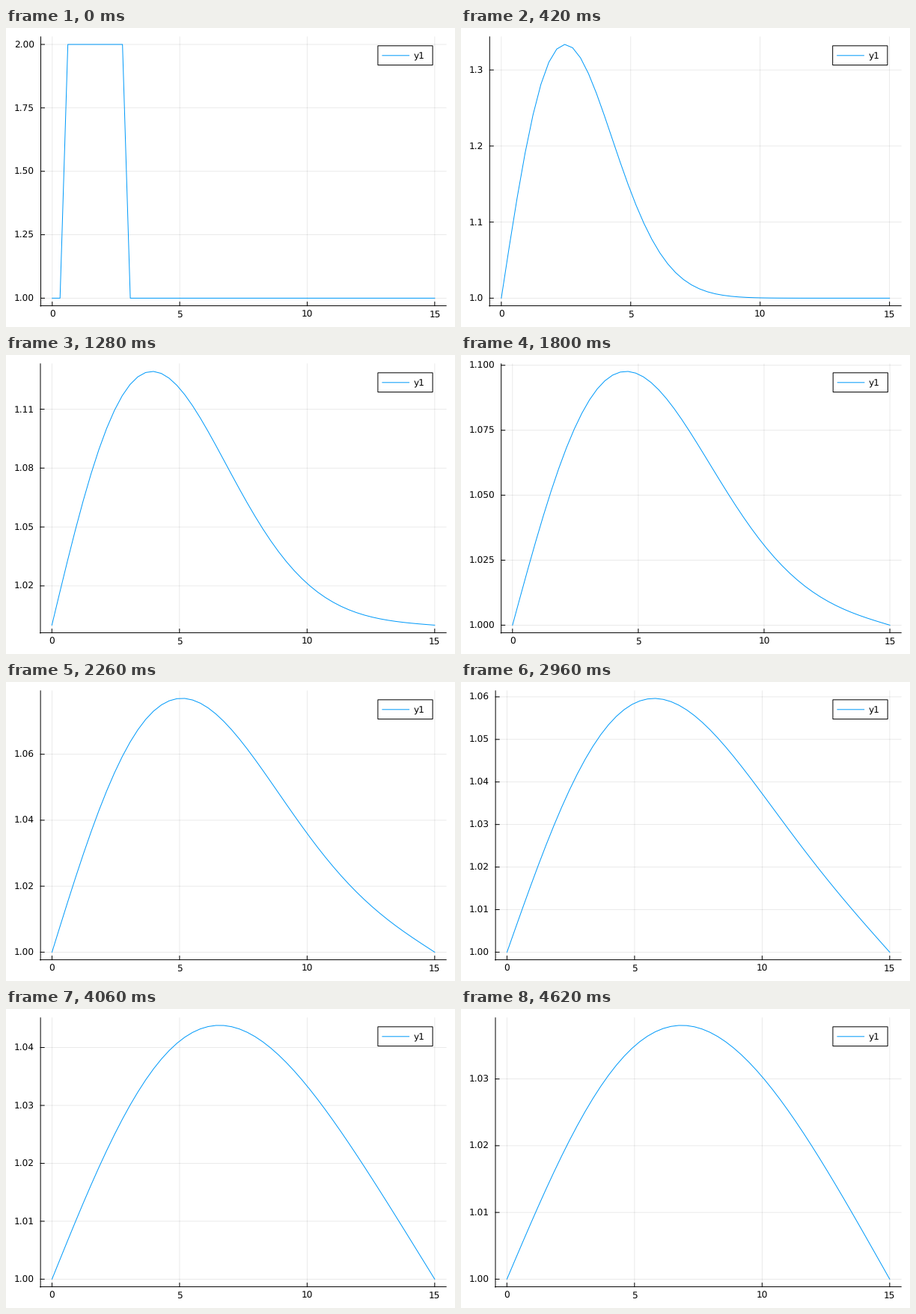
Animation, 600 px wide and 400 px high, one loop 4640 ms. Source, as a matplotlib script:

```python
import math

import numpy as np
import matplotlib.pyplot as plt
from matplotlib.animation import FuncAnimation
from matplotlib.patches import Rectangle
from matplotlib.textpath import TextPath

W, H, DPI = 600, 400, 100
LOOP, TICK = 4640, 20
TOP, BOTTOM, RIGHT = 11.8, 371.6, 588.2
FONT = 12.1
BLUE = "#009AFA"
PAD = 0.03

# Heat equation on 50 points, both ends held at 1, solved with sine modes.
CELLS, LENGTH, DIFFUSION = 49, 15.0, 0.25
xs = np.linspace(0, LENGTH, CELLS + 1)
start = ((xs >= 0.5) & (xs <= 3)).astype(float)
modes = np.arange(1, CELLS)
basis = np.sin(np.pi * np.outer(np.arange(CELLS + 1), modes) / CELLS)
weights = 2 / CELLS * start @ basis
rates = (2 - 2 * np.cos(np.pi * modes / CELLS)) * (CELLS / LENGTH) ** 2

NICE = [(5, 0.9), (3, 0.2), (2.5, 0.5), (2, 0.7), (1, 1.0)]

plt.rcParams["font.family"] = "DejaVu Sans"
plt.rcParams["text.hinting"] = "no_hinting"
fig = plt.figure(figsize=(W / DPI, H / DPI), dpi=DPI, facecolor="white")
ax = fig.add_axes([0, 0, 1, 1])


def profile(step):
    return 1 + basis @ (weights * np.exp(-DIFFUSION * rates * step))


def pick_ticks(lo, hi):
    """Choose 4 to 8 round ticks, weighing count, coverage and niceness."""
    span = hi - lo
    top = math.floor(math.log10(span))
    best, ticks, digits = -1, [], 0
    for z in (top, top - 1, top - 2):
        for q, nice in NICE:
            gap = q * 10.0 ** z
            first = math.ceil(lo / gap - 1e-9)
            n = math.floor(hi / gap + 1e-9) - first + 1
            if not 4 <= n <= 8:
                continue
            score = (0.25 * (1 - abs(n - 5) / 5)
                     + 0.5 * span / ((n - 1) * gap) + 0.25 * nice)
            if score > best + 1e-9:
                best = score
                ticks = [(first + i) * gap for i in range(n)]
                digits = max(0, -z + (q == 2.5))
    return ticks, [f"{t:.{digits}f}" for t in ticks]


def ink_width(text):
    return TextPath((0, 0), text, size=FONT).get_extents().width


def line(x, y, color="black", width=1.0, **kw):
    ax.plot(x, y, color=color, lw=width * 72 / DPI, snap=False, **kw)


def label(x, y, text):
    ax.text(x, y, text, size=FONT * 72 / DPI, ha="left", va="baseline")


def draw_legend(left):
    edge = RIGHT - (RIGHT - left) / 30
    ax.add_patch(Rectangle((edge - 73.2, 23.8), 73.2, 25.8, fc="white",
                           ec="black", lw=72 / DPI, snap=False, zorder=4))
    line([edge - 67.2, edge - 31.5], [36.8, 36.8], BLUE, zorder=5)
    ax.text(edge - 25.6, 41, "y1", size=FONT * 72 / DPI,
            ha="left", va="baseline", zorder=5)


def step_at(ms):
    """Steps last 20, 100 and 20 ms in turn."""
    cycle, phase = divmod(ms, 140)
    return 3 * cycle + (phase >= 20) + (phase >= 120)


def draw(i):
    ax.clear()
    ax.set(xlim=(0, W), ylim=(H, 0))
    ax.axis("off")

    ys = profile(step_at(i * TICK))
    low, high = ys.min(), ys.max()
    margin = PAD * (high - low)
    low, high = low - margin, high + margin
    ticks, names = pick_ticks(low, high)
    left = 21.2 + max(ink_width(s) for s in names)

    def px(x):
        return left + (RIGHT - left) * (x / LENGTH + PAD) / (1 + 2 * PAD)

    def py(y):
        return BOTTOM - (BOTTOM - TOP) * (y - low) / (high - low)

    for value in (0, 5, 10, 15):
        x = px(value)
        line([x, x], [TOP, BOTTOM], width=0.8, alpha=0.1)
        line([x, x], [BOTTOM, BOTTOM - 5])
        text = str(value)
        label(x - 0.318 * FONT * len(text), 387, text)
    for value, text in zip(ticks, names):
        y = py(value)
        line([left, RIGHT], [y, y], width=0.8, alpha=0.1)
        line([left, left + 5], [y, y])
        label(11, y + 4.4, text)

    line([left, left], [TOP, BOTTOM + 0.5])
    line([left - 0.5, RIGHT], [BOTTOM, BOTTOM])
    line(px(xs), py(ys), BLUE, zorder=3)
    draw_legend(left)
    return []


anim = FuncAnimation(fig, draw, frames=LOOP // TICK, interval=TICK,
                     init_func=lambda: [], repeat=True, repeat_delay=0)
plt.show()
```
